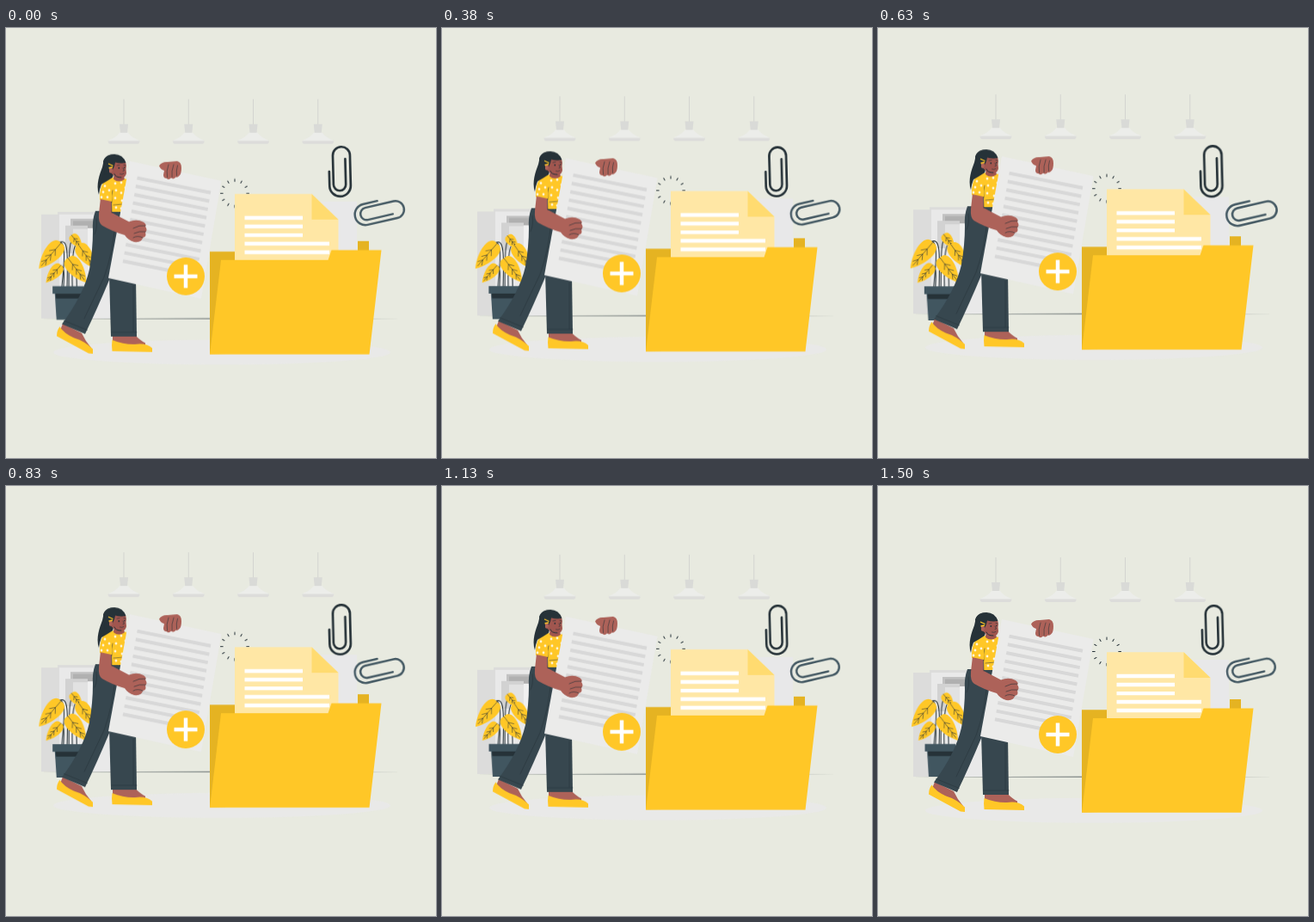
Animation, 500 px wide and 500 px high, one loop 1540 ms. Source, as an HTML page:

```html
<!DOCTYPE html>
<html lang="en">
<head>
<meta charset="utf-8">
<title>Adding a document to a folder</title>
<style>
  html, body { margin: 0; width: 100%; height: 100%; overflow: hidden; background: #e8eae0; }
  svg { display: block; width: 100%; height: 100%; }
  .beat { transform-box: view-box; }
  .ink { fill: none; stroke: #263238; stroke-linecap: round; stroke-linejoin: round; }
  .skin { fill: #ad6259; }
  .face { fill: #a0564f; }
  .gold { fill: #ffc727; }
  .dark { fill: #263238; }
  .cloth { fill: #37474f; }
  .pot { fill: #415660; }
</style>
</head>
<body>
<svg viewBox="0 0 500 500">
  <g class="float">
    <ellipse cx="251" cy="377.300" rx="196" ry="14.500" fill="#e9e9e8"/>
    <g id="lamps"></g>
    <path d="M41 217H62V338H41Z" fill="#dcdcdb"/>
    <path d="M60 214H124V338H60Z" fill="#e9e9e9"/>
    <path d="M60 214H124V217H62V338H60Z" fill="#dcdcdb"/>
    <path d="M75 222H104V234H75Z" fill="#c2c2c2"/>
    <path d="M78 224.500H104V234H78Z" fill="#b0b0b0"/>
    <path d="M69 230H95V262H69Z" fill="#d2d2d2"/>
    <path d="M78 234H95V262H78Z" fill="#e2e2e2"/>
    <path d="M95 233H110V280H95Z" fill="#f0f0f0"/>
    <path d="M345 202H408V262H345Z" fill="#e8e8e9"/>
    <path class="dark" d="M38 338.200L250 337.800L461 338.200L250 338.600Z"/>
    <g id="ticks" class="ink" stroke-width="1"></g>
  </g>

  <g class="beat" style="transform-origin:71px 290px">
    <path class="ink" stroke-width="1" d="M65 301C68 272 70 249 62 250M71 301C72 262 72 246 63 250M73 301C73 272 73 250 77 247M77 301C76 262 79 245 87 253M82 301C82 285 81 270 74 268M67 301C68 284 68 274 62 278"/>
    <g id="leaves"></g>
    <path class="pot" d="M57 307H88L86 338H59Z"/>
    <path class="dark" d="M58 308H88L87.500 314H58.500Z"/>
    <path class="pot" d="M54.500 300H90V308.500H54.500Z"/>
  </g>

  <g class="float">
    <!-- feet and legs -->
    <path class="skin" d="M66 344L88 355Q92 364 99 372L94 374L62 354Z"/>
    <path class="gold" d="M62.500 347.500Q67 355 79 360.500Q91 364 101 373.500V379L96 378.500L59 358.500Q59 352 62.500 347.500Z"/>
    <path class="skin" d="M124 356H149Q155 363 162 366.500V371H124Z"/>
    <path class="gold" d="M123.500 363Q137 368.500 150 368Q163 366 170 372.500V377L123.500 376Q122.500 369 123.500 363Z"/>
    <path class="cloth" d="M119 250L151 290L152 359H122Z"/>
    <path class="cloth" d="M104 213H138L136 232Q130 268 121 291Q106 327 92 356L65 344.500Q90 311 97 281Q101 258 101 236Q100 223 104 213Z"/>
    <path class="ink" stroke-width=".5" d="M67.500 340.500L94.500 351.500M122.500 354H152M127 228Q124 262 114 290L91 338M148 300V353M105 222Q107 232 103 240"/>

    <!-- torso -->
    <path class="gold" d="M113 180Q118 174 126 174L142 176V206L136 214H123V203L109 200Q109 186 113 180Z"/>
    <g id="dots" fill="#fff6dc"></g>
    <path class="ink" d="M123 203Q122 195 124 189M125 206L136 205" stroke-width=".5"/>

    <!-- head -->
    <path class="dark" d="M128 148Q118 146 114 153Q112.500 162 109.500 169Q104.500 184 108 194Q108.500 188 111 182Q118 178 124 174L128 160Z"/>
    <path class="face" d="M126 166L125 176Q131 181 138 176L136 171Z"/>
    <path class="face" d="M121 156L136 152Q141 157 139.500 164L140 169Q139 175 133 174.500Q123 172 119 165Z"/>
    <path class="dark" d="M113 155Q117 147 126 147Q136 147 139.500 157Q133 158 127 156.500Q126 163 122 168L115 171Z"/>
    <path class="skin" d="M120 162Q124 161 124 166Q123 170 120 168Z"/>
    <path d="M119 158L124.500 160.500M119.500 163L124 162" stroke="#ffc727" stroke-width="1.300"/>
    <path class="ink" d="M126 170Q127 174 134 174" stroke-width="1"/>
    <path class="ink" d="M129 160L132 159.500M137 159.500L139 160M136 163L137.500 166L136 166.500M132.500 170Q135 171 137 169.500" stroke-width=".6"/>
    <circle class="dark" cx="131.300" cy="163" r=".9"/>
    <circle class="dark" cx="137.800" cy="162.500" r=".8"/>

    <!-- carried page -->
    <path d="M144 155L250.500 178L227 315L119 291Z" fill="#ebebea"/>
    <g id="rows" stroke="#d8d8d8" stroke-width="4"></g>

    <!-- hands and near arm -->
    <path class="skin" d="M178 160.500Q181 155.500 188 156L199 155Q204 156 204 163Q204 170 201.500 172Q199.500 174.500 197.500 173.500Q195 177 192 174.500Q189 177.500 186.500 175Q183 175 183 171L184 166Q180 165 178 160.500Z"/>
    <path class="ink" d="M189 159Q186 167 187.500 174M195 159Q192 167 193 173.500M199.500 160Q197.500 166 198.500 172" stroke-width=".55"/>
    <path class="skin" d="M110 198L122.500 200L123 215L143 225.500Q152 222 160 226Q164 229 162 231Q165 235 162 238Q164 243 159 244Q158 250 149 249Q142 247 138 241Q124 237 112 230Q107 227 108 216Z"/>
    <path class="ink" d="M162 230Q155 229 148 233M162 237Q155 236 149 239M159 244Q153 241 148 244M122.500 200L123 215" stroke-width=".6"/>
    <path class="gold" d="M113 181Q120 179 123 185L123 202L109 199Q109 188 113 181Z"/>
    <g id="sleeve" fill="#fff6dc"></g>

    <!-- folder -->
    <path d="M237 260.200H409V248H422V260L410 375L237 379.500Z" fill="#e5b322"/>
    <path d="M266 193.200H355.500L386.500 223V275H266Z" fill="#ffe7a5"/>
    <path d="M355.500 193.200L386.500 223H355.500Z" fill="#ffdb70"/>
    <path d="M277.500 221H345M277.500 231H345M277.500 241.200H345M277.500 251H376M277.500 261H376" stroke="#fff" stroke-width="4.300"/>
    <path class="gold" d="M250 270H374.500L378.500 258.500H436.500L422.500 379.700H237Z"/>

    <!-- add badge -->
    <circle class="gold" cx="209" cy="289" r="22"/>
    <path d="M195.500 289H222.500M209 275.500V302.500" stroke="#fff" stroke-width="4.500"/>
  </g>

  <g class="beat" style="transform-origin:420px 183px">
    <path class="ink clip" transform="translate(388.800 167) rotate(-1.500)" stroke-width="2.600"/>
    <path class="ink clip" transform="translate(434 212.300) rotate(77)" style="stroke:#455a64" stroke-width="2.400"/>
  </g>
</svg>

<script>
  const LOOP = 1540, LEAD = 35, RISE = 6.67;
  const all = sel => document.querySelectorAll(sel);
  const fill = (id, parts) => { document.getElementById(id).innerHTML = parts.join(''); };
  const range = n => Array.from({ length: n }, (_, i) => i);

  fill('lamps', range(4).map(i => `<g transform="translate(${137 + i * 75.25} 0)">
    <path d="M0 83V112" stroke="#d3d4d0"/>
    <path d="M-5 112H5L4 122H-4Z" fill="#d9dad7"/>
    <path d="M-5 122H5Q8 127 18 131V132H-18V131Q-8 127 -5 122Z" fill="#ecedea"/>
    <path d="M-18.500 131.500H18.500Q18 135 16 135H-16Q-18 135 -18.500 131.500Z" fill="#dcdcda"/></g>`));

  fill('ticks', range(12).map(i =>
    `<path d="M266 178.700V176" transform="rotate(${i * 30} 266 192.500)"/>`));

  fill('rows', range(11).map(i => {
    const x = 152.5 - i * 1.65, y = 174.6 + i * 9.67;
    return `<path d="M${x} ${y}l85.500 17.200"/>`;
  }));

  // A leaf runs from its stem to its tip, with a vein down the middle.
  function leaf([x, y, tipX, tipY, w]) {
    const len = Math.hypot(tipX - x, tipY - y);
    const turn = Math.atan2(tipY - y, tipX - x) * 180 / Math.PI;
    const veins = [.25, .45, .65].map(k => {
      const a = len * k, b = a + len * .14, s = w * .5 * (1 - k * .6);
      return `M${b} ${-s}L${a} 0L${b} ${s}`;
    }).join('');
    return `<g transform="translate(${x} ${y}) rotate(${turn})">
      <path class="gold" d="M0 0C${-len * .08} ${-w * 1.25} ${len * .5} ${-w * 1.3} ${len} 0C${len * .5} ${w * 1.3} ${-len * .08} ${w * 1.25} 0 0Z"/>
      <path class="ink" stroke-width=".5" d="M0 0H${len * .88}${veins}"/></g>`;
  }
  fill('leaves', [
    [64, 251, 39, 280, 10], [76, 242, 88, 257, 6], [84, 253, 103, 280, 8.5],
    [64, 276, 47, 296, 7], [72, 268, 93, 296, 9.5]
  ].map(leaf));

  const dot = ([x, y]) => `<circle cx="${x}" cy="${y}" r="1.400"/>`;
  fill('dots', [[127, 181], [134, 180], [139, 186], [128, 189], [134, 192],
    [127, 198], [135, 201], [128, 209], [134, 210]].map(dot));
  fill('sleeve', [[115, 184], [120, 189], [113, 191], [118, 197], [111, 197]].map(dot));

  all('.clip').forEach(p => p.setAttribute('d',
    'M-12 0V16.500A12 12 0 0 0 12 16.500V-18A9.750 9.750 0 0 0 -7.500 -18V15A7 7 0 0 0 6.500 15V-14'));

  const play = (sel, frames) => all(sel).forEach(el =>
    el.animate(frames, { duration: LOOP, delay: -LEAD, iterations: Infinity }));

  play('.float', [0, -RISE, 0].map(y => ({ transform: `translateY(${y}px)` })));
  play('.beat', [[0, 1], [.097, 1.1], [.292, 1], [.39, 1], [.487, 1.1], [.584, 1], [1, 1]]
    .map(([offset, s]) => ({ offset, transform: `scale(${s})` })));
</script>
</body>
</html>
```
